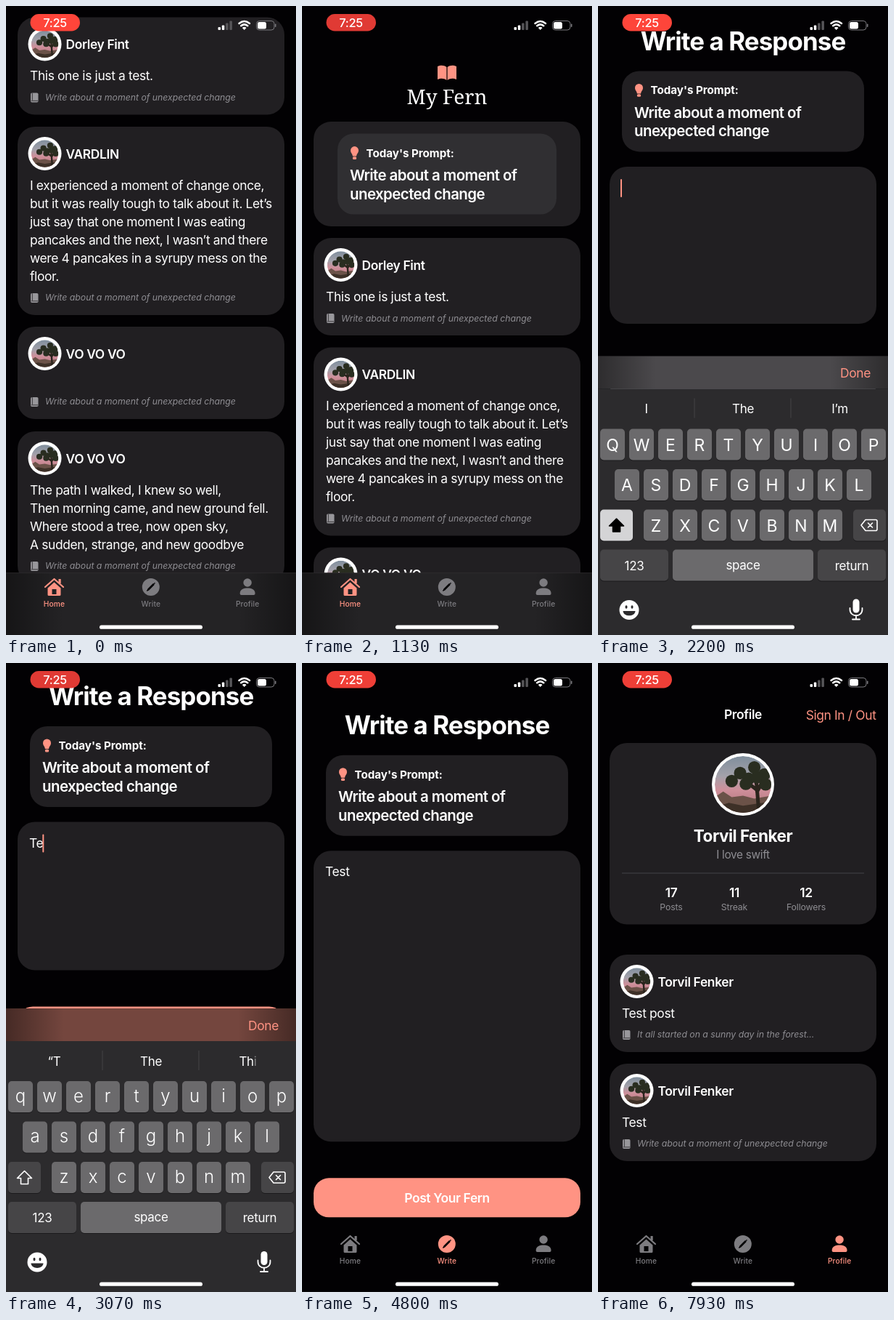
An HTML page for the animation above (8000 ms loop, 400x865 px).

```html
<!DOCTYPE html>
<html lang="en">
<head>
<meta charset="utf-8">
<title>Writing app</title>
<style>
  html, body { margin: 0; width: 100%; height: 100%; overflow: hidden; background: #020103; }
  svg { display: block; width: 100%; height: 100%; font-family: Inter, Roboto, sans-serif; }
  text { fill: #fff; font-size: 17.44px; letter-spacing: -.0215em; white-space: pre; }
  .mid { text-anchor: middle; }
  .end { text-anchor: end; }
  .strong { font-weight: 600; }
  .accent { fill: #ff9383; }
  .gray { fill: #8e8d92; }
  .note { fill: #8e8d92; font-size: 12.3px; font-style: italic; letter-spacing: -.002em; }
  .hint { font-size: 15.2px; font-weight: 700; letter-spacing: -.002em; }
  .prompt { font-size: 20.5px; font-weight: 600; letter-spacing: -.029em; }
  .title { font-size: 34.9px; font-weight: 700; letter-spacing: -.026em; }
  .brand { font: 28px "Noto Serif", serif; letter-spacing: 0; }
  .tab { font-size: 10.26px; font-weight: 500; letter-spacing: .01em; fill: inherit; }
  .clock { font-size: 16.4px; font-weight: 500; letter-spacing: -.02em; }
  .person { font-size: 22.5px; font-weight: 700; }
  .bio { font-size: 15.4px; }
  .label { font-size: 12.3px; letter-spacing: -.012em; }
  .upper { font-size: 23px; letter-spacing: 0; }
  .lower { font-size: 24px; font-weight: 300; letter-spacing: 0; }
  .word { font-size: 17px; letter-spacing: -.02em; }
</style>
</head>
<body>
<svg id="stage" viewBox="0 0 400 865" preserveAspectRatio="none"></svg>
<script>
const PROMPT = 'Write about a moment of unexpected change';
const ACCENT = '#ff9383', CARD = '#211f22', BLACK = '#020103';

// Markup helpers; text is placed by the centre of its capitals.
const text = (x, y, string, cls = '', attrs = '') =>
  `<text x="${x}" y="${y}" dy=".364em" class="${cls}" ${attrs}>${string}</text>`;
const box = (x, y, w, h, r, fill, attrs = '') =>
  `<rect x="${x}" y="${y}" width="${w}" height="${h}" rx="${r}" fill="${fill}" ${attrs}/>`;
const at = (x, y, content, attrs = '') => `<g transform="translate(${x} ${y})" ${attrs}>${content}</g>`;
const path = (d, attrs = '') => `<path d="${d}" ${attrs}/>`;
const line = (d, color, width) =>
  path(d, `fill="none" stroke="${color}" stroke-width="${width}" stroke-linecap="round" stroke-linejoin="round"`);

const icons = {
  house: line('M-12.5 0L0-11L12.5 0', 'currentColor', 2.2) +
    path('M-9 1.500L0-6.500L9 1.500V10.500Q9 12 7.500 12H-7.500Q-9 12-9 10.500ZM-3 3V10H3V3Z', 'fill-rule="evenodd"') +
    box(6, -11, 3.2, 6, 0.5, 'currentColor'),
  pencil: '<circle r="12"/>' + line('M-3.500 3.500L3.500-3.500', BLACK, 2.6) +
    line('M-5 5L-4.500 4.500M5-5L5.200-5.200', BLACK, 1.6),
  person: '<circle cy="-6" r="5.700"/>' + path('M-10.500 9C-10.500 3-5 1.500 0 1.500S10.500 3 10.500 9Q10.500 11 8.500 11H-8.500Q-10.500 11-10.500 9Z'),
  bulb: path('M-5.500-3.500a5.500 5.500 0 0 1 11 0C5.500 0 3 1 2.600 4.500H-2.600C-3 1-5.500 0-5.500-3.500Z') +
    box(-2.6, 5.3, 5.2, 3.6, 1.5, ACCENT),
  openBook: path('M-.6-8C-4-11-9-11-13-9V9C-9 7-4 7-.6 10ZM.6-8C4-11 9-11 13-9V9C9 7 4 7 .6 10Z'),
  book: box(-5, -6.5, 10.5, 13, 1.8, '#98979b') + line('M-2.700-6V3.200M-4 4.300H4.800', CARD, 0.8),
  shift: 'M0-9.500L10 .5H5V8.500H-5V.5H-10Z',
  erase: line('M-11 0L-5-7.500H9Q11-7.500 11-5.500V5.500Q11 7.500 9 7.500H-5ZM-1.500-3L4.500 3M4.500-3L-1.500 3', '#fff', 1.6),
  smile: '<circle r="13.500" fill="#fff"/>' + path('M-8.500 1.500H8.500C8 10-8 10-8.500 1.500Z', 'fill="#2c2b2d"') +
    '<ellipse cx="-4" cy="-4" rx="1.500" ry="2.300" fill="#2c2b2d"/><ellipse cx="4" cy="-4" rx="1.500" ry="2.300" fill="#2c2b2d"/>',
  mic: box(-4.5, -14.5, 9, 19, 4.5, '#fff') + line('M-8.500-2V0C-8.500 11 8.500 11 8.500 0V-2M0 8.500V13M-5 13.500H5', '#fff', 1.8)
};

// Desert tree at sunset, inside a unit circle.
const clumps = [[-.4, -.12], [-.1, -.4], [.2, -.2], [.4, -.6], [.75, -.35], [.5, -.25], [.8, 0], [.1, -.02]];
const defs = `<defs>
  <linearGradient id="sky" x2="0" y2="1"><stop offset="0" stop-color="#7f8e9c"/><stop offset=".35" stop-color="#a3a1aa"/>
    <stop offset=".6" stop-color="#cf8f9a"/><stop offset="1" stop-color="#a96f76"/></linearGradient>
  <linearGradient id="edges"><stop offset="0" stop-opacity=".4"/><stop offset=".2" stop-opacity="0"/>
    <stop offset=".8" stop-opacity="0"/><stop offset="1" stop-opacity=".4"/></linearGradient>
  <clipPath id="round"><circle r="1"/></clipPath>
  <g id="photo" clip-path="url(#round)"><circle r="1" fill="url(#sky)"/>
    ${path('M-1 .45L-.7 .25L-.4 .45L0 .4L.4 .5L1 .4V1H-1Z', 'fill="#6b5248"')}
    ${path('M-1 .8L-.5 .65L0 .75L1 .6V1H-1Z', 'fill="#3d3027"')}
    ${line('M.55 .85L.5 .2L.05-.15M.5 .25L.75-.2M.5 .1L.4-.4', '#2a241c', 0.13)}
    ${clumps.map(([x, y]) => `<circle cx="${x}" cy="${y}" r=".22" fill="#292d20"/>`).join('')}</g>
</defs>`;

const avatar = (x, y, ring, r) => at(x, y,
  `<circle r="${ring}" fill="#fff"/><use href="#photo" transform="scale(${r})"/>`);

function card(y, name, lines, note = PROMPT) {
  const height = lines.length ? 109 + 25 * lines.length : 127;
  return at(0, y, box(16, 0, 368, height, 24, CARD) + avatar(53.5, 37, 23, 18.7) +
    text(82.5, 37.5, name, 'strong') +
    lines.map((s, i) => text(33, 80.5 + 25 * i, s)).join('') +
    at(39, height - 23.5, icons.book) + text(54, height - 24, note, 'note'));
}

const promptText = (x, y) => at(x + 6.5, y, icons.bulb, `fill="${ACCENT}"`) +
  text(x + 22.5, y, "Today's Prompt:", 'hint') +
  text(x, y + 30.5, 'Write about a moment of', 'prompt') + text(x, y + 56, 'unexpected change', 'prompt');

const tabs = active => [['Home', 'house'], ['Write', 'pencil'], ['Profile', 'person']].map(([name, icon], i) => {
  const color = i === active ? ACCENT : '#7d7c80';
  return at(66.5 + 133.3 * i, 799, icons[icon] + text(0, 23.5, name, 'tab mid'), `fill="${color}" color="${color}"`);
}).join('');

const backdrop = box(0, 0, 400, 865, 0, BLACK);

const home = `<g>${backdrop}<g id="feed">
  ${at(200, 93, icons.openBook, `fill="${ACCENT}"`)}${text(200, 126, 'My Fern', 'brand mid')}
  ${box(16, 160, 368, 144, 24, CARD)}${box(49, 176.5, 302, 111, 22, '#302f32')}${promptText(66, 203)}
  ${card(320, 'Dorley Fint', ['This one is just a test.'])}
  ${card(470.5, 'VARDLIN', ['I experienced a moment of change once,',
    'but it was really tough to talk about it. Let’s', 'just say that one moment I was eating',
    'pancakes and the next, I wasn’t and there', 'were 4 pancakes in a syrupy mess on the', 'floor.'])}
  ${card(745.5, 'VO VO VO', [])}
  ${card(889.5, 'VO VO VO', ['The path I walked, I knew so well,', 'Then morning came, and new ground fell.',
    'Where stood a tree, now open sky,', 'A sudden, strange, and new goodbye'])}</g>
  ${box(0, 779.5, 400, 86, 0, '#242325')}${box(0, 779.5, 400, 86, 0, 'url(#edges)')}
  ${box(0, 779.5, 400, 0.6, 0, '#343335')}${tabs(0)}</g>`;

const write = `<g id="write">${backdrop}<g id="form">
  ${text(200, 85.5, 'Write a Response', 'title mid')}
  ${box(33, 127, 334, 111, 24, CARD)}${promptText(50, 153.5)}
  ${box(16, 258.5, 368, 402, 24, CARD, 'id="area"')}
  ${text(32, 287.5, '', '', 'id="draft"')}${box(31, 275.5, 2, 25, 1, ACCENT, 'id="caret"')}
  <g id="post">${box(16, 0, 368, 54, 21, ACCENT, 'id="postFill"')}${text(200, 27, 'Post Your Fern', 'strong mid')}</g></g>
  <g id="toast">${box(114, 388, 172, 53, 21, '#2b2a2d')}${text(200, 414.5, 'Post Successful!', 'strong mid')}</g>
  ${tabs(1)}</g>`;

const stat = (x, count, name) => text(x, 316, count, 'strong mid') + text(x, 336, name, 'label gray mid');
const profile = `<g id="profile">${backdrop}
  ${text(200, 71, 'Profile', 'strong mid')}${text(383.5, 71.5, 'Sign In / Out', 'accent end')}
  ${box(16, 110, 368, 249.5, 24, CARD)}${avatar(200, 167, 43, 39)}
  ${text(200, 238, 'Torvil Fenker', 'person mid')}${text(200, 263.5, 'I love swift', 'bio gray mid')}
  ${box(33, 288.5, 334, 1, 0, '#454448')}
  ${stat(101, 17, 'Posts')}${stat(188, 11, 'Streak')}${stat(287, 12, 'Followers')}
  ${card(401, 'Torvil Fenker', ['Test post'], 'It all started on a sunny day in the forest...')}
  ${card(551, 'Torvil Fenker', ['Test'])}${tabs(2)}</g>`;

const key = (x, y, w, fill = '#6b6a6c', attrs = '') =>
  box(x, y + 1, w, 43, 5, '#1b1a1c') + box(x, y, w, 43, 5, fill, attrs);
const rows = [['qwertyuiop', 3, 100], ['asdfghjkl', 23, 155.5], ['zxcvbnm', 63, 211]];
const eachLetter = draw => rows.map(([letters, x, y]) =>
  [...letters].map((c, i) => draw(c, x + 40 * i, y)).join('')).join('');

const keyboard = `<g id="keyboard">
  ${box(0, 0, 400, 45, 0, '#141315', 'id="accessory"')}${box(0, 0, 400, 45, 0, 'url(#edges)', 'id="vignette"')}
  ${text(376, 23.5, 'Done', 'accent end', 'id="done"')}
  ${box(0, 45, 400, 346, 0, '#2c2b2d')}
  ${box(132.5, 58, 1, 27, 0, '#454446')}${box(265.5, 58, 1, 27, 0, '#454446')}
  ${[66.5, 200, 333.5].map(x => text(x, 72.5, '', 'word mid', 'data-hint')).join('')}
  ${eachLetter((c, x, y) => key(x, y, 34))}
  <g id="capitals">${eachLetter((c, x, y) => text(x + 17, y + 22, c.toUpperCase(), 'upper mid'))}</g>
  <g id="smalls">${eachLetter((c, x, y) => text(x + 17, y + 20, c, 'lower mid'))}</g>
  ${key(3, 211, 45, '#464547', 'id="shiftKey"')}
  ${at(25.5, 233, path(icons.shift, 'id="shift" stroke-width="1.600" stroke-linejoin="round"'))}
  ${key(352, 211, 45, '#464547')}${at(374, 232.5, icons.erase)}
  ${key(3, 266, 94, '#464547')}${text(50, 288, '123', 'word mid')}
  ${key(103, 266, 194)}${text(200, 287, 'space', 'word mid')}
  ${key(303, 266, 94, '#464547')}${text(350, 288, 'return', 'word mid')}
  ${at(43, 349, icons.smile)}${at(356, 348.5, icons.mic)}</g>`;

const status = box(33.5, 11, 68.5, 23.5, 11.75, '#ff453a', 'id="pill"') + text(67.5, 23, '7:25', 'clock mid') +
  [4, 6.5, 9.5, 12.5].map((h, i) => box(292.5 + 5.3 * i, 33 - h, 3.5, h, 1, i < 2 ? '#fff' : '#565558')).join('') +
  line('M321.500 24Q328.700 18 336 24M324.200 27.300Q328.700 23.500 333.300 27.300', '#fff', 2.5) +
  path('M328.700 33L325.800 30Q328.700 27.700 331.600 30Z', 'fill="#fff"') +
  box(345.5, 20.5, 24.5, 12.5, 4, 'none', 'stroke="#79787c"') + box(371, 24.5, 1.5, 4.5, 0.7, '#79787c') +
  box(347, 22, 12, 9.5, 2.5, '#fff') + box(129, 851.5, 142, 5.3, 2.65, '#fff');

const stage = document.getElementById('stage');
stage.innerHTML = defs + home + write + profile + keyboard + status;
const el = Object.fromEntries([...stage.querySelectorAll('[id]')].map(node => [node.id, node]));
const hintSlots = stage.querySelectorAll('[data-hint]');

// Motion helpers.
const clamp = v => Math.min(1, Math.max(0, v));
const ramp = (t, from, to) => clamp((t - from) / (to - from));
const spring = (ms, rate) => ms <= 0 ? 0 : 1 - (1 + rate * ms / 1000) * Math.exp(-rate * ms / 1000);
const mix = (a, b, k) => `rgb(${a.map((v, i) => Math.round(v + (b[i] - v) * k))})`;
const track = (points, t) => {
  const i = points.findIndex(p => p[0] > t);
  if (i < 0) return points[points.length - 1][1];
  const [t0, v0] = points[i - 1], [t1, v1] = points[i];
  return v0 + (v1 - v0) * (t - t0) / (t1 - t0);
};
const move = (node, y) => node.setAttribute('transform', `translate(0 ${y.toFixed(2)})`);
const fade = (node, opacity) => {
  node.style.opacity = opacity;
  node.style.display = opacity > 0 ? '' : 'none';
};

const RISE = 1753, FALL = 4147, LAYOUT_LAG = 39, CLEAR = 5530;
const pillDim = [[0, 0], [800, 0], [1130, 1], [1330, .7], [1730, .7], [1930, .2], [2150, 0], [2670, .4],
  [3070, 1], [3470, .5], [3900, 0], [4400, 0], [4930, .7], [5330, .7], [6070, .1], [6999, .1], [7000, .55]];
const typing = [
  [0, '', ['I', 'The', 'I’m']],
  [2670, 'T', ['“T”', 'The', 'This']],
  [3000, 'Te', ['“T', 'The', 'Th<tspan opacity=".4">i</tspan>']],
  [3130, 'Te', ['“Te”', 'Test', 'Tell']],
  [3330, 'Tes', ['“Tes”', 'Test', 'Testing']],
  [3660, 'Test', ['“Test”', 'Testimony', 'Testing']],
  [CLEAR, '', ['I', 'The', 'I’m']]
];
let shownStep;

function showTyping(step) {
  if (step === shownStep) return;
  shownStep = step;
  const [, draft, hints] = step;
  el.draft.textContent = draft;
  hintSlots.forEach((slot, i) => slot.innerHTML = hints[i]);
  el.postFill.setAttribute('fill', draft ? ACCENT : '#8f8e94');
  el.capitals.style.display = draft ? 'none' : '';
  el.smalls.style.display = draft ? '' : 'none';
  el.shiftKey.setAttribute('fill', draft ? '#464547' : '#d4d4d6');
  el.shift.setAttribute('fill', draft ? 'none' : '#000');
  el.shift.setAttribute('stroke', draft ? '#fff' : '#000');
}

function render(t) {
  move(el.feed, -304.5 * (1 - spring(t - 70, 7.5)));
  fade(el.write, ramp(t, 1140, 1330));
  fade(el.profile, ramp(t, 7530, 7870));
  el.pill.setAttribute('fill', mix([255, 69, 58], [224, 58, 52], track(pillDim, t)));

  const step = typing.filter(s => s[0] <= t).pop();
  showTyping(step);

  // The form follows the keyboard a little later and more softly.
  const raised = (lag, rate) => spring(t - RISE - lag, rate) - spring(t - FALL - lag, rate);
  const keyboardTop = 865 - 390 * raised(0, 13.5);
  const squeeze = raised(LAYOUT_LAG, 11);
  const areaHeight = 402 - 198 * squeeze;
  const postTop = 308.5 + areaHeight;
  move(el.form, -40 * squeeze);
  el.area.setAttribute('height', areaHeight);
  move(el.post, postTop);
  el.post.style.opacity = t > 5330 && t < CLEAR ? 1 - .5 * ramp(t, 5330, 5430) : 1;
  el.caret.style.display = t > RISE && t < FALL ? '' : 'none';
  el.caret.setAttribute('x', 31 + (step[1] ? el.draft.getComputedTextLength() : 0));
  fade(el.toast, ramp(t, 5700, 6070));

  // The translucent toolbar picks up the colour of the button behind it.
  const top = postTop - 40 * squeeze;
  const overlap = clamp((Math.min(top + 54, keyboardTop + 45) - Math.max(top, keyboardTop)) / 40);
  el.accessory.setAttribute('fill', mix([20, 19, 21], step[1] ? [116, 70, 62] : [76, 74, 77], overlap));
  el.vignette.style.opacity = overlap;
  el.done.style.opacity = 1 - .55 * ramp(t, 4080, 4180);
  move(el.keyboard, keyboardTop);
  el.keyboard.style.display = keyboardTop < 864.8 ? '' : 'none';
}

const start = performance.now();
function tick() {
  render((performance.now() - start) % 8000);
  requestAnimationFrame(tick);
}
tick();
</script>
</body>
</html>
```
